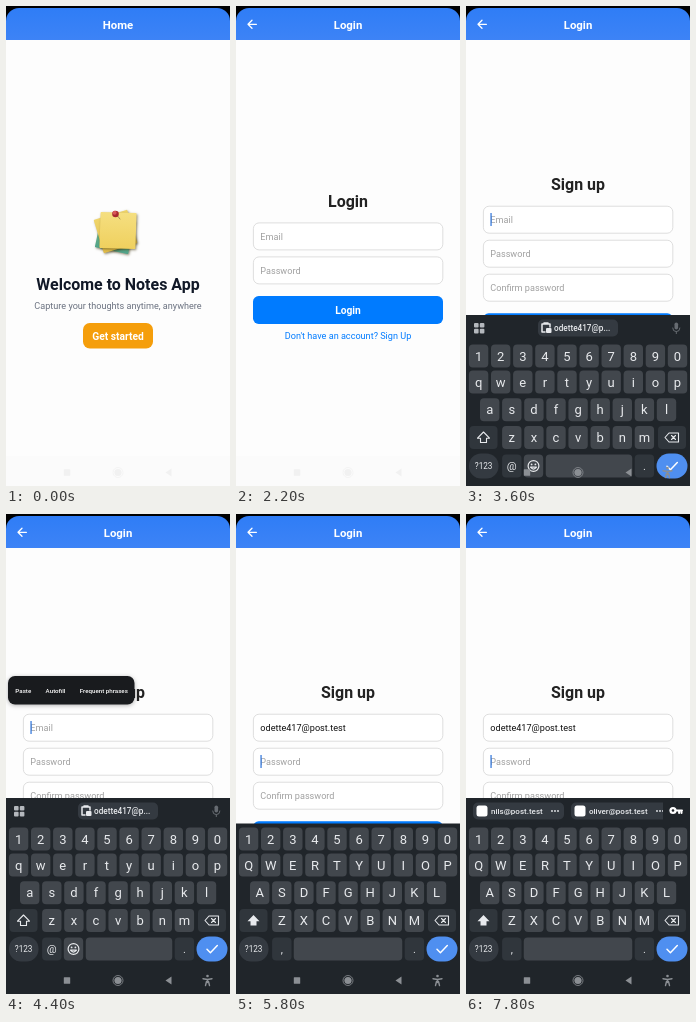
Write an HTML page with a canvas that moves like this. It is 224 by 480 pixels and loops after 8 s.

```html
<!DOCTYPE html>
<html lang="en">
<head>
<meta charset="utf-8">
<title>Notes App</title>
<style>
html, body { margin: 0; width: 100%; height: 100%; overflow: hidden; background: #000; }
canvas { display: block; width: 224px; height: 480px; }
</style>
</head>
<body>
<canvas id="stage"></canvas>
<script>
const W = 224, H = 480, LOOP = 8000, STEP = 200;
const EMAIL = 'odette417@post.test';
const BLUE = '#007bff', PANEL = '#20252a', LIGHT = '#e8eaed';

// Moments of the story, in ms
const AT = { login: 1600, signup: 2800, keys: 3400, menu: 4200, paste: 4800, password: 5400, logins: 6800 };

const canvas = document.getElementById('stage');
const ctx = canvas.getContext('2d');
const dpr = window.devicePixelRatio || 1;
canvas.width = W * dpr;
canvas.height = H * dpr;

function box(x, y, w, h, r, fill, stroke) {
  ctx.beginPath();
  ctx.roundRect(x, y, w, h, r);
  if (fill) { ctx.fillStyle = fill; ctx.fill(); }
  if (stroke) { ctx.strokeStyle = stroke; ctx.lineWidth = 0.8; ctx.stroke(); }
}

function disc(x, y, r, fill) {
  ctx.beginPath();
  ctx.arc(x, y, r, 0, Math.PI * 2);
  ctx.fillStyle = fill;
  ctx.fill();
}

// y is the middle of the capital letters
function text(s, x, y, size, color, weight = 400, align = 'center') {
  ctx.font = `${weight} ${size}px Roboto, sans-serif`;
  ctx.textAlign = align;
  ctx.fillStyle = color;
  ctx.fillText(s, x, y + size * 0.355);
}

function icon(d, x, y, color, width) {
  const path = new Path2D(d);
  ctx.save();
  ctx.translate(x, y);
  ctx.lineCap = ctx.lineJoin = 'round';
  if (width) {
    ctx.strokeStyle = color;
    ctx.lineWidth = width;
    ctx.stroke(path);
  } else {
    ctx.fillStyle = color;
    ctx.fill(path);
  }
  ctx.restore();
}

function layer(alpha, dy, draw) {
  ctx.save();
  ctx.globalAlpha = alpha;
  ctx.translate(0, dy);
  draw();
  ctx.restore();
}

function header(title, back) {
  const g = ctx.createLinearGradient(0, 2, 0, 34);
  g.addColorStop(0, '#2f7df6');
  g.addColorStop(1, '#3d83f6');
  box(0, 2, W, 32, [13, 13, 0, 0], g);
  text(title, 112, 19, 11.4, '#fff', 700);
  if (back) icon('M4.4 0H-4M0 -4L-4 0L0 4', 16, 18.3, '#fff', 1.3);
}

function page() {
  ctx.fillStyle = '#000';
  ctx.fillRect(0, 0, W, H);
  ctx.fillStyle = '#fdfdfd';
  ctx.fillRect(0, 30, W, H - 30);
  ctx.fillStyle = '#fbfbfb';
  ctx.fillRect(0, 450, W, 30);
}

function note(x, y, size, angle, from, to) {
  const h = size / 2;
  ctx.save();
  ctx.translate(x, y);
  ctx.rotate(angle * Math.PI / 180);
  const g = ctx.createLinearGradient(0, -h, 0, h);
  g.addColorStop(0, from);
  g.addColorStop(1, to);
  ctx.shadowColor = 'rgba(60,50,10,.55)';
  ctx.shadowBlur = 2.5 * dpr;
  ctx.shadowOffsetX = dpr;
  ctx.shadowOffsetY = 1.2 * dpr;
  box(-h, -h, size, size, 0.8, g);
  ctx.restore();
}

function notes() {
  note(109, 228, 34, 12, '#8fc37a', '#4fa38b');
  note(109.5, 225.5, 35, -17, '#f0d56a', '#e0bb48');
  note(112, 224.5, 36, 2, '#f5df80', '#efd05e');
  icon('M0 0L4 5', 110, 208, 'rgba(90,70,30,.5)', 1);
  disc(109.5, 208, 3.3, '#a82a30');
  disc(108.6, 206.8, 2, '#d8575a');
}

function home() {
  notes();
  text('Welcome to Notes App', 112, 278, 15.96, '#111827', 700);
  text('Capture your thoughts anytime, anywhere', 112, 300, 9.12, '#6b7280');
  box(77, 317, 70, 25.5, 6.8, '#f59e0b');
  text('Get started', 112, 330, 10.26, '#fff', 700);
}

function field(y, hint, value) {
  box(17.4, y + 0.4, 189.4, 27, 5.7, '#fff', '#d6d6d6');
  text(value || hint, 24.3, y + 14, 9.12, value ? '#111' : '#a0a0a0', 400, 'left');
}

function form(top, title, hints, value, action, link) {
  text(title, 112, top, 15.96, '#222', 700);
  hints.forEach((hint, i) => field(top + 21 + i * 34, hint, i === 0 && value));
  const y = top + 26.5 + hints.length * 34;
  box(17, y, 190, 28, 5.7, BLUE);
  text(action, 112, y + 14.3, 10.26, '#fff', 700);
  text(link, 112, y + 40, 9.12, BLUE);
}

const login = () =>
  form(195.5, 'Login', ['Email', 'Password'], '', 'Login', "Don't have an account? Sign Up");

const signup = value =>
  form(178.8, 'Sign up', ['Email', 'Password', 'Confirm password'], value,
    'Sign Up', 'Already have an account? Login');

function caret(x, y, age) {
  if (Math.floor(age / 500) % 2) return;
  ctx.fillStyle = '#3b7ddd';
  ctx.fillRect(x, y - 6.5, 1.3, 13);
}

function key(x, y, w, label, fill = '#42474d', size = 13) {
  box(x - w / 2, y - 11.5, w, 23, 4, fill);
  if (label) text(label, x, y, size, LIGHT);
}

function row(chars, x, y) {
  [...chars].forEach((c, i) => key(x + i * 22.1, y, 19.4, c));
}

function keyboard(upper) {
  const dim = '#30363c', letters = s => upper ? s.toUpperCase() : s;
  row('1234567890', 12.6, 325);
  row(letters('qwertyuiop'), 12.6, 351);
  row(letters('asdfghjkl'), 23.7, 378.7);
  row(letters('zxcvbnm'), 45.8, 406.5);
  key(17.5, 406.5, 28, '', dim);
  icon('M0 -5.5L6 0.7H3V5H-3V0.7H-6Z', 17.5, 406.5, LIGHT, upper ? 0 : 1.1);
  key(206, 406.5, 28, '', dim);
  icon('M-3 -4.5H6.5V4.5H-3L-7 0ZM-0.5 -2L3.5 2M3.5 -2L-0.5 2', 206, 406.5, LIGHT, 1.1);

  const y = 435;
  box(3, y - 12.5, 29.5, 25, 12, '#343a41');
  text('?123', 17.6, y, 8.2, LIGHT);
  key(45.8, y, 19.4, upper ? ',' : '@', dim, 11);
  if (upper) {
    key(112, y, 108.5, '');
  } else {
    key(67.5, y, 19.4, '');
    icon('M5.4 0A5.4 5.4 0 1 1 -5.4 0A5.4 5.4 0 1 1 5.4 0M-3 1.2Q0 5 3 1.2Z', 67.5, y, LIGHT, 1.2);
    disc(65.6, y - 1.6, 0.9, LIGHT);
    disc(69.4, y - 1.6, 0.9, LIGHT);
    key(123, y, 86.5, '');
  }
  key(178.4, y, 19.4, '.', dim, 11);
  box(190.5, y - 12.5, 31, 25, 12.5, '#4f8ff0');
  icon('M-5 0.3L-1.6 3.7L5.3 -3.4', 206, y, '#fff', 1.5);
}

function clipBar() {
  for (const x of [8, 13.8]) for (const y of [292, 297.8]) box(x, y, 4.6, 4.6, 1, '#b4b8bd');
  box(72, 288.5, 80, 17, 5, '#343a41');
  icon('M-4 -4H4V-1M-4 -4V4H-1M-2 -5H2', 80, 297, LIGHT, 1.5);
  box(80, 297, 5.5, 5, 1, LIGHT);
  text(EMAIL.slice(0, 11) + '...', 88, 297, 8.2, LIGHT, 500, 'left');
  box(208.5, 291.5, 3.6, 7, 1.8, '#666b71');
  icon('M-3.6 -1A3.6 3.6 0 0 0 3.6 -1M0 2.6V4.6', 210.3, 298, '#666b71', 1);
}

function loginChip(x, w, address, dots) {
  box(x, 288.5, w, 17, 5, '#343a41');
  box(x + 3.5, 291.5, 11, 11, 2.5, '#fff');
  text(address, x + 18, 297, 8, LIGHT, 500, 'left');
  for (let i = 0; i < dots; i++) disc(x + w - 12 + i * 3, 297, 0.9, LIGHT);
}

function loginBar() {
  loginChip(7, 91, 'nils@post.test', 3);
  ctx.save();
  ctx.beginPath();
  ctx.rect(0, 284, 197, 26);
  ctx.clip();
  loginChip(105, 98, 'oliver@post.test', 3);
  ctx.restore();
  icon('M0 0H6.5M3.6 0V2.4M6 0V2.4', 209.5, 296.5, '#fff', 2);
  disc(207, 296.5, 3.6, '#fff');
  disc(207, 296.5, 1.3, PANEL);
}

function navigation(color, full) {
  box(57.8, 463.3, 6.4, 6.4, 0.5, color);
  disc(112, 466.5, 3.6, color);
  ctx.beginPath();
  ctx.arc(112, 466.5, 5, 0, Math.PI * 2);
  ctx.strokeStyle = color;
  ctx.lineWidth = 0.8;
  ctx.stroke();
  icon('M-3.5 0L2.5 -4V4Z', 163, 466.5, color);
  if (!full) return;
  disc(201.5, 462, 1.3, color);
  icon('M-4.5 -1.8L0 -1L4.5 -1.8M0 -1V2M-2 5L-1 1H1L2 5', 201.5, 466.5, color, 1.4);
}

function panel(t) {
  const left = Math.max(0, 1 - (t - AT.keys) / 400);
  const upper = t >= AT.password;
  const bar = !upper || t >= AT.logins;
  layer(1, 200 * left ** 3, () => {
    ctx.fillStyle = PANEL;
    ctx.fillRect(0, bar ? 284 : 309.5, W, 200);
    if (bar) (upper ? loginBar : clipBar)();
    keyboard(upper);
  });
}

function menu() {
  ctx.save();
  ctx.shadowColor = 'rgba(0,0,0,.3)';
  ctx.shadowBlur = 4 * dpr;
  ctx.shadowOffsetY = dpr;
  box(2, 162, 126.5, 28.5, 7, '#191b1e');
  ctx.restore();
  text('Paste', 17.3, 176.5, 6.2, '#fff', 500);
  text('Autofill', 49.5, 176.5, 6.2, '#fff', 500);
  text('Frequent phrases', 97.8, 176.5, 6.2, '#fff', 500);
}

function carets(t) {
  if (t >= AT.password) {
    caret(24.4, 247.5, t - AT.password);
  } else if (t >= AT.paste) {
    ctx.font = '400 9.12px Roboto, sans-serif';
    caret(25 + ctx.measureText(EMAIL).width, 213.5, t - AT.paste);
  } else {
    caret(24.4, 213.5, t - AT.keys);
  }
}

function draw(t) {
  ctx.setTransform(dpr, 0, 0, dpr, 0, 0);
  page();
  const p = Math.min(1, Math.max(0, (t - AT.login) / 350));
  const rise = 1 - (1 - p) ** 2;
  if (t < AT.signup) {
    if (rise < 1) layer(1 - rise, 0, home);
    if (rise > 0) layer(rise, 10 * (1 - rise), login);
  } else {
    signup(t >= AT.paste ? EMAIL : '');
  }
  header(rise > 0 ? 'Login' : 'Home', rise > 0);
  if (t < AT.keys) {
    navigation('#f1f1f1');
    return;
  }
  carets(t);
  if (t >= AT.menu && t < AT.paste) menu();
  panel(t);
  navigation('#8b8f94', true);
}

function tick(now) {
  draw(Math.floor((now % LOOP) / STEP) * STEP);
  requestAnimationFrame(tick);
}
draw(0);
requestAnimationFrame(tick);
</script>
</body>
</html>
```
